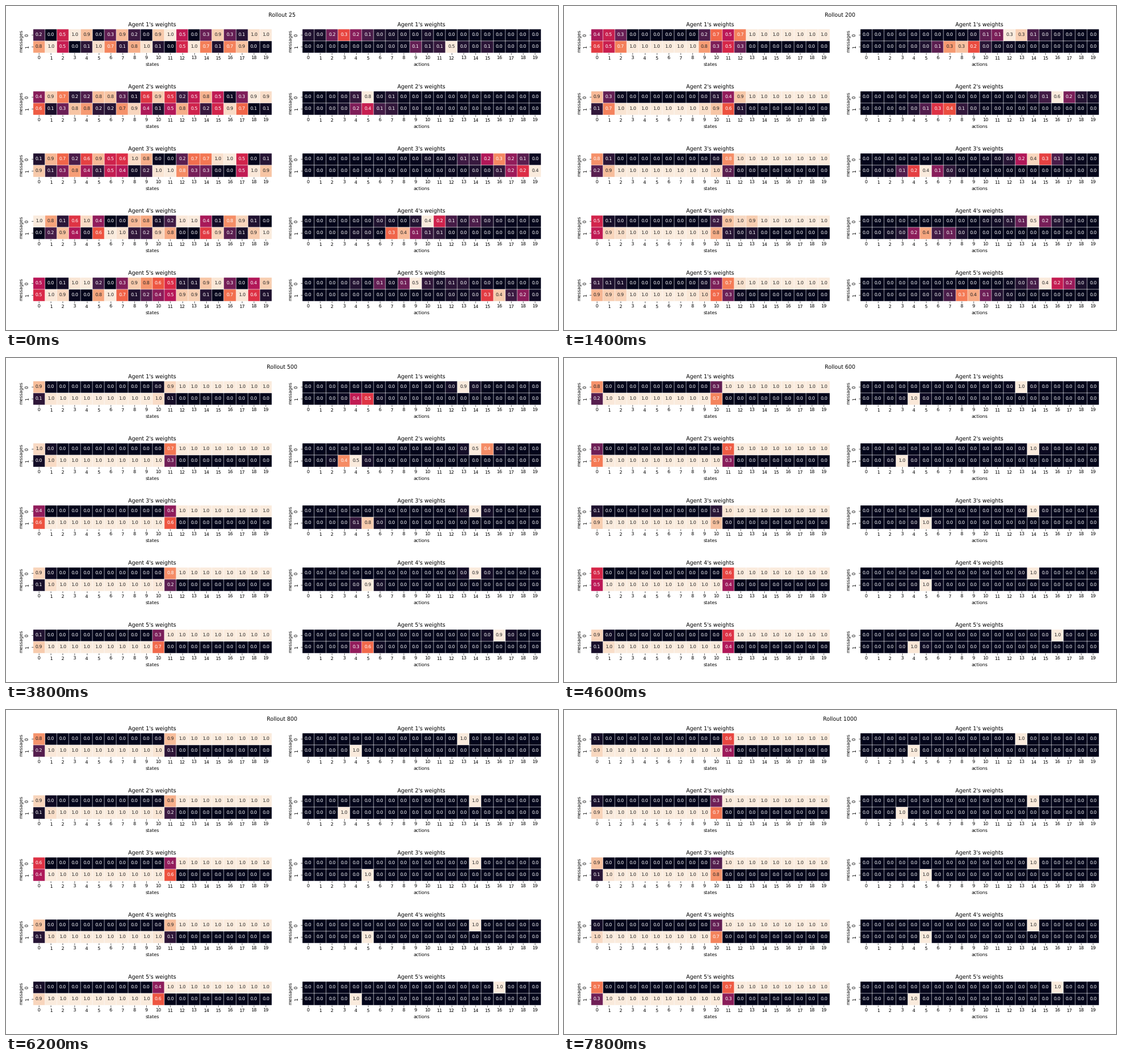
Animation of 976 by 574 pixels, one loop 8000 ms. Source, as a matplotlib script:

```python
import numpy as np
import matplotlib.pyplot as plt
from matplotlib.animation import FuncAnimation
from matplotlib.colors import LinearSegmentedColormap

W, H, DPI = 976, 574, 64
S = 57.4 / DPI  # point scale
AGENTS, COLS, STEP, FRAMES = 5, 20, 25, 40
LEARNED, DONE = 325, 700  # rollouts where the policies take shape and settle

plt.rcParams.update({
    "font.family": "DejaVu Sans",
    "font.size": 10 * S,
    "text.hinting": "none",
})

rocket = LinearSegmentedColormap.from_list("rocket", [
    "#03051a", "#221331", "#451c47", "#6a1f56", "#921c5b", "#b91657",
    "#d92847", "#ed513e", "#f47c56", "#f6a47c", "#f7c9aa", "#faebdd"])

rng = np.random.default_rng(4)
cells = np.arange(COLS)
freq = rng.uniform(.4, 1.7, (3, AGENTS, 1))
phase = rng.uniform(0, 2 * np.pi, (3, AGENTS, 1))
edge_phase = rng.uniform(0, 2 * np.pi, (2, AGENTS, 1))
taste = rng.normal(0, .8, (AGENTS, 2, COLS))

# Favourite action of each agent for messages 0 and 1
first = np.array([(4, 11), (5, 5), (17, 19), (11, 8.5), (9, 16)])
middle = np.array([(13, 7.5), (17, 6.6), (14, 3.8), (14, 5), (16, 8)])
goal = np.array([(13, 4), (14, 3), (14, 5), (14, 5), (16, 4)])


def progress(rollout, start, end):
    return np.clip((rollout - start) / (end - start), 0, 1)


def ease_out(u):
    return 1 - (1 - u) ** 3


def state_weights(rollout):
    """Waves of random preference turn into a step between two edges."""
    u = progress(rollout, STEP, LEARNED)
    waves = np.sin(freq * cells + phase + rollout / 90).sum(axis=0)
    low, high = .5 * np.sin(rollout / 50 + edge_phase)
    step = np.maximum(low - cells, cells - high - 10.6)
    p = 1 / (1 + np.exp(-2 * (1 - u) * waves - 6 * u ** 2 * step))
    return np.stack([p, 1 - p], axis=1)


def action_weights(rollout):
    """A peak that sharpens while it moves to the goal."""
    u = progress(rollout, STEP, LEARNED)
    v = progress(rollout, LEARNED, DONE)
    center = (first + (middle - first) * ease_out(u)
              + (goal - middle) * ease_out(v))
    width = np.interp(rollout, [STEP, LEARNED, DONE], [1.5, .5, .15])
    logits = -abs(cells - center[..., None]) / width + (1 - u) * taste
    q = np.exp(logits)
    return q / q.sum(axis=-1, keepdims=True)


def text_colors(rgb):
    lin = np.where(rgb <= .03928, rgb / 12.92, ((rgb + .055) / 1.055) ** 2.4)
    light = lin @ np.array([.2126, .7152, .0722]) > .408
    return np.where(light, ".15", "w")


class Heatmap:
    def __init__(self, fig, left, top, title, xlabel):
        w, h = 422.4, 42.24
        ax = fig.add_axes([left / W, 1 - (top + h) / H, w / W, h / H])
        self.mesh = ax.pcolormesh(np.zeros((2, COLS)), cmap=rocket,
                                  edgecolors="white", linewidth=.5,
                                  antialiased=True)
        ax.set(xlim=(0, COLS), ylim=(2, 0))
        ax.spines[:].set_visible(False)
        ax.tick_params(length=3.5 * S, pad=3.5 * S, width=.8 * S)
        ax.set_xticks(cells + .5, range(COLS))
        ax.set_yticks([.5, 1.5], [0, 1], rotation=90, va="center")
        ax.set_title(title, fontsize=12 * S, pad=6 * S)
        ax.set_xlabel(xlabel, labelpad=4 * S)
        ax.set_ylabel("messages", labelpad=4 * S)
        self.texts = [ax.text(c + .5, r + .5, "", ha="center", va="center")
                      for r in range(2) for c in range(COLS)]

    def show(self, data):
        self.mesh.set_array(data)
        self.mesh.set_clim(data.min(), data.max())
        rgb = self.mesh.to_rgba(data.ravel())[:, :3]
        for t, v, color in zip(self.texts, data.flat, text_colors(rgb)):
            t.set_text(f"{v:.1f}")
            t.set_color(str(color))


fig = plt.figure(figsize=(W / DPI, H / DPI), dpi=DPI, facecolor="white")
heading = fig.suptitle("", fontsize=12 * S)
panels = [
    (weights, [Heatmap(fig, left, 40.76 + 110 * i, f"Agent {i + 1}'s weights",
                       name) for i in range(AGENTS)])
    for weights, left, name in ((state_weights, 47.5, "states"),
                                (action_weights, 523.6, "actions"))]


def update(i):
    rollout = STEP * (i + 1)
    heading.set_text(f"Rollout {rollout}")
    for weights, maps in panels:
        for heatmap, data in zip(maps, weights(rollout)):
            heatmap.show(data)


anim = FuncAnimation(fig, update, frames=FRAMES, interval=200,
                     init_func=lambda: update(0), repeat=True, repeat_delay=0)
plt.show()
```
